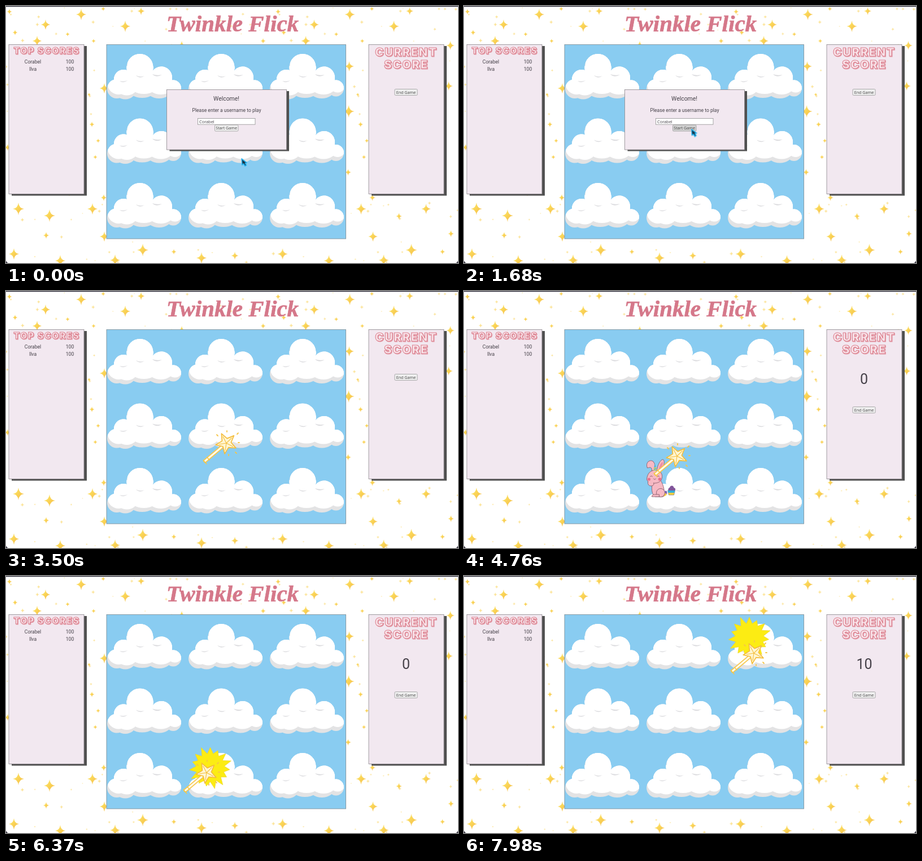
An HTML page for the animation above (8000 ms loop, 800 by 456 pixels).

```html
<!DOCTYPE html>
<html lang="en">
<head>
<meta charset="utf-8">
<title>Twinkle Flick</title>
<style>
  html, body { margin: 0; width: 100%; height: 100%; overflow: hidden; background: #fff; }
  svg { display: block; width: 800px; height: 456px; }
  text { font-family: Roboto, sans-serif; font-size: 8.6px; fill: #454048; text-anchor: middle; }
  .title { font: italic bold 41px "Liberation Serif", serif; fill: #d5788a; stroke: #d5788a; stroke-width: .7; }
  .sign { font: 900 15.6px Inter, sans-serif; letter-spacing: 1.7px; fill: #f8e3e9; stroke: #dc7f8d; stroke-width: 1.1;
    filter: drop-shadow(1px 1px 0 #e29aa6); }
  .sign.big { font-size: 20.2px; }
  .score { font-size: 25px; }
  .button text { font: 7.2px "Open Sans", sans-serif; fill: #444; }
  .button rect { fill: #efefef; stroke: #9b9b9b; stroke-width: .8; }
  .panel { fill: #f2e8f0; stroke: #8a858a; stroke-width: .8; }
  .shade { fill: #505050; }
  .outline { fill: none; stroke: #6b4858; stroke-width: .8; stroke-linecap: round; }

  .anim { animation: 8s linear infinite; }
  .step { animation: 8s step-end infinite; visibility: hidden; }
  .pointer { animation-name: pointer; }
  .wand { animation-name: wand; }
  .step.intro { animation-name: intro; }
  .step.play { animation-name: play; }
  .step.zero { animation-name: zero; }
  .step.ten { animation-name: ten; }
  .step.bunny1 { animation-name: bunny1; }
  .step.burst1 { animation-name: burst1; }
  .step.bunny2 { animation-name: bunny2; }
  .step.burst2 { animation-name: burst2; }
  .start rect { animation: hover 8s step-end infinite; }
  .end { animation: drop 8s step-end infinite; }

  @keyframes pointer {
    0%, 8% { transform: translate(417px, 271px); animation-timing-function: ease-in-out; }
    18%, 100% { transform: translate(402.5px, 218.5px); }
  }
  @keyframes wand {
    0%, 22.75% { transform: translate(424px, 208px); animation-timing-function: ease-in-out; }
    31.5% { transform: translate(428px, 230px); animation-timing-function: ease-in-out; }
    42%, 44% { transform: translate(390px, 270px); animation-timing-function: ease-in-out; }
    56%, 67% { transform: translate(377px, 293px); animation-timing-function: ease-in-out; }
    77%, 85% { transform: translate(355px, 349px); animation-timing-function: ease-in-out; }
    97%, 100% { transform: translate(513px, 137px); }
  }
  @keyframes intro { 0% { visibility: visible; } 22.75%, 100% { visibility: hidden; } }
  @keyframes play { 0% { visibility: hidden; } 22.75%, 100% { visibility: visible; } }
  @keyframes zero { 0% { visibility: hidden; } 51.6% { visibility: visible; } 80.5%, 100% { visibility: hidden; } }
  @keyframes ten { 0% { visibility: hidden; } 80.5%, 100% { visibility: visible; } }
  @keyframes bunny1 { 0% { visibility: hidden; } 53.3% { visibility: visible; } 78.7%, 100% { visibility: hidden; } }
  @keyframes burst1 { 0% { visibility: hidden; } 78.7% { visibility: visible; } 86.6%, 100% { visibility: hidden; } }
  @keyframes bunny2 { 0% { visibility: hidden; } 88.3% { visibility: visible; } 98.8%, 100% { visibility: hidden; } }
  @keyframes burst2 { 0% { visibility: hidden; } 98.8%, 100% { visibility: visible; } }
  @keyframes hover { 0% { fill: #efefef; } 17.4%, 100% { fill: #d2d2d2; } }
  @keyframes drop { 0% { transform: none; } 51.6%, 100% { transform: translateY(58px); } }
</style>
</head>
<body>
<svg viewBox="0 0 800 456">
  <defs>
    <pattern id="sky" width="475.5" height="456" patternUnits="userSpaceOnUse"></pattern>
    <linearGradient id="gold" x2="1" y2="1">
      <stop offset=".3" stop-color="#fbdc5c"/><stop offset="1" stop-color="#f5b845"/>
    </linearGradient>
    <clipPath id="cloudClip"></clipPath>
    <g id="lobes"></g>
    <g id="cloud">
      <use href="#lobes" fill="#e3e3e4"/>
      <g clip-path="url(#cloudClip)"><use href="#lobes" fill="#fff" x="3" y="-7"/><use href="#lobes" fill="#fff" x="1" y="-8"/></g>
      <path d="M51 38Q58 45 66 39Q59 42 51 38M80 36Q87 43 97 37Q88 39 80 36M22 48Q29 53 36 47Q30 50 22 48" fill="#dcdcdf"/>
    </g>

    <!-- Local origin is the centre of the burst. -->
    <g id="bunny">
      <path d="M-7 16q5 -4 5 3q-3 5 -7 3" fill="#7a62b8"/>
      <path d="M-8 18q5 0 5 4l-5 3" fill="#f6cb45"/>
      <g fill="#f6b9c4" stroke="#7d5363" stroke-width=".8">
        <path d="M-29 -20C-29 -29 -32 -27 -37 -26C-40 -34 -36 -39 -30 -39Q-23 -39 -22 -20Z"/>
        <path d="M-20 -20C-20 -31 -13 -42 -9 -41C-5 -38 -8 -27 -14 -18Z"/>
        <path d="M-27 -3C-31 9 -29 23 -23 25L-9 25C-5 18 -8 4 -14 -5Z"/>
        <path d="M-38 -6C-37 -17 -31 -22 -23 -22C-14 -22 -10 -16 -11 -9C-12 -2 -18 1 -25 1C-32 1 -37 -1 -38 -6Z"/>
        <ellipse cx="-13.5" cy="18" rx="7.5" ry="7.5"/>
        <path d="M-36 -2q-1 8 6 8q6 -1 4 -6"/>
        <path d="M-29 25q0 -4 5 -4h8v4Z"/>
      </g>
      <path d="M-17 -23Q-15 -34 -10 -37Q-8 -31 -15 -22Z" fill="#ee8fa3"/>
      <path d="M-26 -21L-24 -34L-20 -21Z" fill="#46b5dd"/>
      <path d="M-26 -25l5 -2M-26 -22l6 -1" stroke="#f5cf4c" stroke-width="1.4"/>
      <g fill="#e96f8d"><circle cx="-34" cy="-6" r="2.6"/><circle cx="-15" cy="-6" r="2.8"/></g>
      <path class="outline" d="M-32 -11q2 -2 4 0M-20 -11q2 -2 4 0M-26 -7q2 3 4 0"/>
      <path d="M-1 14H12L10 22H1Z" fill="#f8cf3c" stroke="#5b6b8b" stroke-width=".6"/>
      <path d="M-1 14H12L11 18H0Z" fill="#36afd7"/>
      <path d="M0 14C-1 9 3 10 4 6Q9 4 10 9Q14 10 12 14Z" fill="#80559a"/>
    </g>
  </defs>

  <rect width="800" height="456" fill="#fff"/>
  <rect width="800" height="456" fill="url(#sky)"/>
  <path d="M0 0H800V1.3H0ZM0 456V452Q1 455 4 456ZM800 456V452Q799 455 796 456Z" fill="#272532"/>
  <text class="title" x="401" y="45">Twinkle Flick</text>

  <rect class="shade" x="10" y="71" width="133" height="265.5"/>
  <rect class="panel" x="5" y="68.5" width="133" height="265"/>
  <text class="sign" x="72" y="84.5">TOP SCORES</text>
  <text x="47.5" y="102.3">Corabel</text><text x="113" y="102.3">100</text>
  <text x="47.5" y="114.6">Ilva</text><text x="113" y="114.6">100</text>

  <rect class="shade" x="647" y="71" width="133" height="265.5"/>
  <rect class="panel" x="642" y="68.5" width="133" height="265"/>
  <text class="sign big" x="708.5" y="88.5">CURRENT</text>
  <text class="sign big" x="708.5" y="111">SCORE</text>
  <text class="score step zero" x="708" y="165">0</text>
  <text class="score step ten" x="708.5" y="165">10</text>
  <g class="button end">
    <rect x="688" y="147.5" width="40" height="11" rx="1.5"/><text x="708" y="155.7">End Game</text>
  </g>

  <rect x="178" y="68.5" width="423.5" height="344.5" fill="#89ccf1" stroke="#83939c" stroke-width=".9"/>
  <g id="clouds"></g>

  <g class="step bunny1"><use href="#bunny" x="361.5" y="340"/></g>
  <g class="step bunny2"><use href="#bunny" x="505" y="109"/></g>
  <g class="step burst1"><path class="burst" transform="translate(361.5 340)"/></g>
  <g class="step burst2"><path class="burst" transform="translate(505 109)"/></g>

  <g class="step intro">
    <rect class="shade" x="289.5" y="151" width="211.5" height="106.5"/>
    <rect class="panel" x="284.5" y="148.5" width="212" height="106.5"/>
    <text x="390" y="167.5" style="font-size:10.4px">Welcome!</text>
    <text x="390.5" y="188.3">Please enter a username to play</text>
    <rect x="339.5" y="199.5" width="101.5" height="10.7" fill="#fff" stroke="#929292" stroke-width=".8"/>
    <text x="342" y="207.6" style="text-anchor:start;font:7.4px 'Open Sans',sans-serif">Corabel</text>
    <g class="button start">
      <rect x="369.5" y="211" width="41.5" height="11" rx="1.5"/><text x="390.2" y="219.2">Start Game</text>
    </g>
    <g class="anim pointer">
      <path d="M0 0L1 11L3.6 9L6 13L8.5 11.5L6.5 8L9 7Z" fill="#173548" stroke="#27b3ef" stroke-width="1.6" stroke-linejoin="round"/>
    </g>
  </g>

  <g class="step play"><g class="anim wand" stroke-linecap="round" stroke-linejoin="round">
    <path d="M-37.5 31.5L-6 5" stroke="#f6c648" stroke-width="6.4"/>
    <path d="M-37.5 31.5L-6 5" stroke="#fffbe9" stroke-width="3.2"/>
    <path d="M-41 30L-35 37M-34 25L-30 30" stroke="#f6c648" stroke-width="1.5"/>
    <path id="wandStar" fill="#fff6d2" stroke="#f4bd3c" stroke-width="1.7"/>
    <path id="wandRays" stroke="#f4bd3c" stroke-width="1.1"/>
    <path d="M1 -20v-2M19 -16l2 -2M21 -1h2M16 16l2 2M-15 -13l-2 -2M4 20v2" stroke="#f6c648" stroke-width="1.8"/>
  </g></g>
</svg>
<script>
  const $ = selector => document.querySelector(selector);
  const polar = (radius, angle) =>
    `${(radius * Math.cos(angle)).toFixed(1)} ${(radius * Math.sin(angle)).toFixed(1)}`;

  function starPath(points, outer, inner, turn, wobble = 0) {
    const corners = Array.from({ length: points * 2 }, (_, i) => {
      const radius = i % 2 ? inner : outer + wobble * Math.sin(i * 2.3);
      return polar(radius, turn + i * Math.PI / points);
    });
    return `M${corners.join('L')}Z`;
  }

  // x, y and radius of the larger sparkles in one tile
  const sparkles = [
    [70, 33, 9], [133, 15, 10], [55, 62, 9], [6, 10, 5], [16, 47, 5], [109, 50, 4],
    [155, 62, 4], [211, 36, 10], [239, 9, 7], [172, 5, 4], [311, 70, 8], [455, 62, 5],
    [308, 142, 8], [132, 107, 9], [131, 187, 11], [174, 146, 9], [147, 157, 3],
    [152, 210, 5], [163, 239, 4], [158, 268, 4], [130, 295, 6], [3, 251, 6],
    [173, 340, 6], [22, 360, 11], [77, 372, 11], [153, 360, 10], [174, 409, 9],
    [14, 440, 10], [71, 407, 6], [96, 452, 10], [242, 433, 11], [193, 451, 10],
    [297, 436, 5], [346, 447, 10], [405, 443, 7], [312, 404, 6], [268, 360, 9], [220, 373, 6]
  ];
  const sparkle = (x, y, r, opacity = 1) =>
    `<path d="M0-1Q.1-.1 .9 0Q.1.1 0 1Q-.1.1-.9 0Q-.1-.1 0-1Z" fill="url(#gold)" opacity="${opacity}"
      transform="translate(${x} ${y}) scale(${r})"/>`;
  let seed = 17;
  const random = () => (seed = seed * 16807 % 2147483647) / 2147483647;
  const flecks = Array.from({ length: 130 }, () =>
    sparkle(random() * 475, random() * 456, 1 + 3 * random(), .6));
  $('#sky').innerHTML = flecks.join('') + sparkles.map(s => sparkle(...s)).join('');

  // centre and radii of the overlapping puffs of a cloud
  const puffs = [
    [58, 24, 23.5, 24], [29, 45, 17, 17], [96, 42, 19, 19.5], [117, 61, 14, 14.5],
    [17, 62, 17, 17], [32, 64, 19, 16.5], [62, 60, 26, 18], [92, 62, 23, 17], [62, 44, 30, 18]
  ];
  $('#lobes').innerHTML = $('#cloudClip').innerHTML = puffs.map(([x, y, rx, ry]) =>
    `<ellipse cx="${x}" cy="${y}" rx="${rx}" ry="${ry}"/>`).join('');
  $('#clouds').innerHTML = Array.from({ length: 9 }, (_, i) =>
    `<use href="#cloud" x="${179 + i % 3 * 144}" y="${85 + Math.floor(i / 3) * 114.5}"/>`).join('');

  for (const burst of document.querySelectorAll('.burst')) {
    burst.setAttribute('d', starPath(15, 36, 25, -Math.PI / 2, 3));
    burst.setAttribute('fill', '#fcec13');
    burst.setAttribute('stroke', '#ecd52a');
    burst.setAttribute('stroke-width', '.7');
  }

  const wandTurn = -Math.PI / 4;
  $('#wandStar').setAttribute('d', starPath(5, 19, 8.5, wandTurn));
  $('#wandRays').setAttribute('d', Array.from({ length: 5 }, (_, i) =>
    `M0 0L${polar(13, wandTurn + i * Math.PI * .4)}`).join(''));
</script>
</body>
</html>
```
